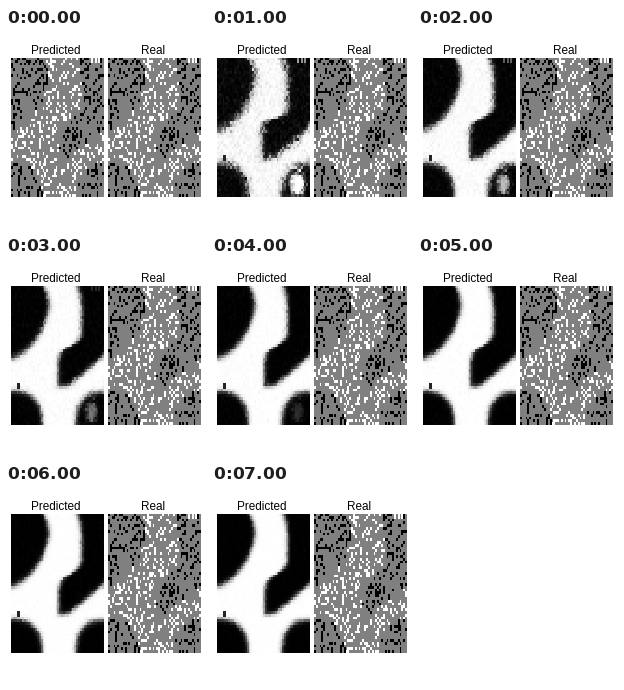
Animation of 200x200 px, one loop 8000 ms. Source, as a matplotlib script:

```python
import numpy as np
import matplotlib.pyplot as plt
from matplotlib.animation import FuncAnimation

SIZE, DPI = 200, 100
CELLS = 50
STEPS = 8
LEFT, TOP, WIDTH, HEIGHT = 5, 30, 92.5, 139.5
GAP = 97.5

rng = np.random.default_rng(11)

# Cell centres in stage pixels
unit = (np.arange(CELLS) + 0.5) / CELLS
X, Y = np.meshgrid(LEFT + unit * WIDTH, TOP + unit * HEIGHT)


def sigmoid(t):
    return 1 / (1 + np.exp(-np.clip(t, -60, 60)))


def blob(cx, cy, rx, ry, power):
    """Signed depth inside a superellipse, positive inside."""
    r = (np.abs((X - cx) / rx) ** power
         + np.abs((Y - cy) / ry) ** power) ** (1 / power)
    return (1 - r) * min(rx, ry)


def soft_min(parts, radius):
    return -radius * np.logaddexp.reduce([-p / radius for p in parts])


def dark_depth(fade):
    """Signed depth inside the dark regions; fade=1 early, 0 settled."""
    edge = 75 - 4 * (np.maximum(60 - Y, 0) / 30) ** 2
    edge -= (22 + 3 * fade) * sigmoid((Y - 91) / (4 - 2 * fade))
    slope = (131 - 0.86 * (X - 62) - Y) / 1.3
    hook = soft_min([X - edge, slope, 131 - Y], 1.5)
    return np.maximum.reduce([
        hook,
        blob(LEFT, 50, 38, 53, 1.6),
        blob(LEFT, TOP + HEIGHT, 31, 34, 2.5),
        blob(LEFT + WIDTH, TOP + HEIGHT, 28, 33, 2.5),
    ])


# Only a random part of the truth is observed; the rest stays grey
ticks = np.zeros((CELLS, CELLS), bool)
ticks[:2, 43:49:2] = True
observed = (rng.random((CELLS, CELLS)) < 0.23) | ticks
truth = np.where((dark_depth(0) > 0) & ~ticks, 0.0, 1.0)
REAL = np.where(observed, truth, 0.5)

cell_noise = rng.normal(size=(CELLS, CELLS))
step_noise = rng.normal(size=(STEPS, CELLS, CELLS))


def predict(step):
    if step == 0:
        return REAL
    fade = 1 / step
    depth = dark_depth(fade)
    noise = (0.2 + 0.9 * fade) * (0.6 * cell_noise + 0.5 * step_noise[step])
    value = sigmoid(noise - depth / (1 + 0.4 * fade))

    # Uncertain patch that shrinks as the fit improves
    glow = max(0, 1.3 - 0.28 * step)
    reach = blob(85, 157, 4 + 3 * fade, 7 + 4 * fade, 2)
    value += glow * sigmoid(reach + cell_noise)

    # Faint haze, fading ticks and one lasting misfit
    haze = 0.04 * fade * np.abs(step_noise[step])
    value += np.where(depth > 0, haze, -haze)
    value[ticks] += max(0, 0.75 - 0.2 * step)
    value[35:37, 3:5] *= 0.15
    return np.clip(value, 0, 1)


fig = plt.figure(figsize=(SIZE / DPI, SIZE / DPI), dpi=DPI, facecolor="white")


def panel(left, title):
    ax = fig.add_axes([left / SIZE, 1 - (TOP + HEIGHT) / SIZE,
                       WIDTH / SIZE, HEIGHT / SIZE])
    ax.axis("off")
    fig.text((left + WIDTH / 2 - 1.5) / SIZE, 1 - 26.5 / SIZE, title,
             ha="center", va="baseline", family="Liberation Sans",
             fontsize=11.8 * 72 / DPI, color="black")
    return ax.imshow(REAL, cmap="gray", vmin=0, vmax=1, aspect="auto",
                     interpolation="nearest")


predicted = panel(LEFT, "Predicted")
panel(LEFT + GAP, "Real")


def update(step):
    predicted.set_data(predict(step))
    return [predicted]


anim = FuncAnimation(fig, update, frames=STEPS, interval=1000, repeat=True,
                     repeat_delay=0, blit=False)
plt.show()
```
